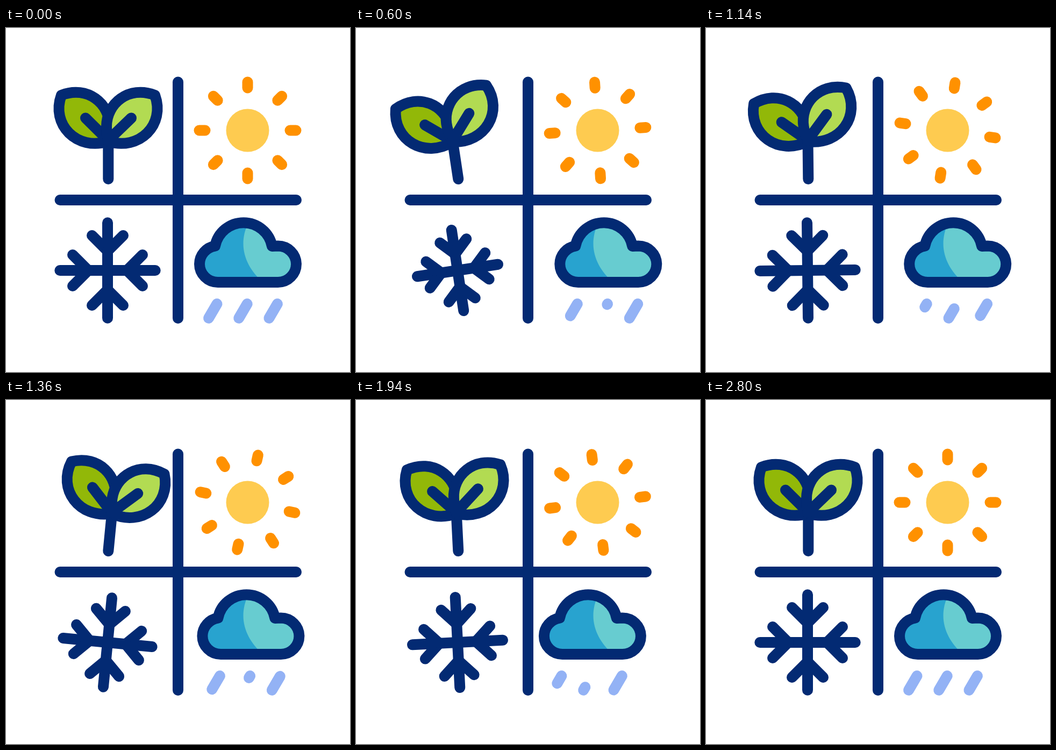
Animation of 640x640 px, one loop 3020 ms. Source, as an HTML page with a canvas:

```html
<!DOCTYPE html>
<html lang="en">
<head>
<meta charset="utf-8">
<title>Four seasons</title>
<style>
html, body { margin: 0; width: 100%; height: 100%; overflow: hidden; background: #fff; }
canvas { display: block; width: 640px; height: 640px; }
</style>
</head>
<body>
<canvas width="640" height="640"></canvas>
<script>
const c = document.querySelector('canvas').getContext('2d');
const LOOP = 3020;
const NAVY = '#032a73';

const rightLeaf = new Path2D('M190 211C248 229 297 180 277 125C228 106 187 141 187 183Q187 200 190 211Z');
const leftLeaf = new Path2D('M190 211C132 229 83 180 103 125C152 106 193 141 193 183Q193 200 190 211Z');
const cloud = new Path2D('M394 473A34 34 0 0 1 360 439A34 34 0 0 1 389 405.6A54 54 0 0 1 495 406L506 405.5A34 34 0 0 1 540 439A34 34 0 0 1 506 473Z');
const cloudLight = new Path2D('M451 362C430 405 446 445 478 473H640V340H451Z');

const clamp = v => Math.min(1, Math.max(0, v));
const ease = v => { v = clamp(v); return v * v * (3 - 2 * v); };

// Eased value through [time, value] pairs.
function track(t, keys) {
  let [t0, v0] = keys[0];
  for (const [t1, v1] of keys) {
    if (t < t1) return v0 + (v1 - v0) * ease((t - t0) / (t1 - t0));
    t0 = t1;
    v0 = v1;
  }
  return v0;
}

const swing = t => track(t, [[0, 0], [800, -10.1], [1405, 5.8], [1905, -3], [2250, 0]]);
const nod = t => track(t, [[210, 0], [1000, -12.3], [1560, 8], [2050, -1.5], [2400, 0]]);
const shrink = t => track(t, [[0, 1], [530, .85], [1150, 1], [1620, .85], [2150, 1]]);
const drift = t => track(t, [[0, 0], [885, 25.5], [1777, -11], [2700, 0]]);
const spin = t => track(t, [[85, 0], [2525, 360]]);

function line(x0, y0, x1, y1, color = NAVY) {
  c.strokeStyle = color;
  c.beginPath();
  c.moveTo(x0, y0);
  c.lineTo(x1, y1);
  c.stroke();
}

function shape(path, fill) {
  c.fillStyle = fill;
  c.fill(path);
  c.strokeStyle = NAVY;
  c.stroke(path);
}

function rotateAt(x, y, deg) {
  c.translate(x, y);
  c.rotate(deg * Math.PI / 180);
  c.translate(-x, -y);
}

function group(draw) {
  c.save();
  draw();
  c.restore();
}

function plant(t) {
  rotateAt(190.3, 281, swing(t));
  line(190.3, 210, 190.3, 281);
  rotateAt(190, 210, nod(t));
  shape(leftLeaf, '#92b808');
  line(148, 167.5, 190, 209);
  shape(rightLeaf, '#b2db52');
  line(233, 167.5, 190, 209);
}

function sun(t) {
  c.translate(449.5, 190.5);
  c.fillStyle = '#fecb50';
  c.beginPath();
  c.arc(0, 0, 40, 0, 7);
  c.fill();
  c.rotate(spin(t) * Math.PI / 180);
  for (let i = 0; i < 8; i++) {
    line(0, -79, 0, -90, '#ff9100');
    c.rotate(Math.PI / 4);
  }
}

function snowflake(t) {
  const s = shrink(t);
  c.translate(189, 451);
  c.rotate(swing(t) * Math.PI / 180);
  for (let i = 0; i < 4; i++) {
    line(0, 0, 0, -88.7 * s);
    line(0, -36 * s, -29 * s, -65 * s);
    line(0, -36 * s, 29 * s, -65 * s);
    c.rotate(Math.PI / 2);
  }
}

function rainCloud(t) {
  const dx = drift(t);
  c.translate(dx, 0);
  group(() => {
    c.clip(cloud);
    c.translate(-dx, 0);
    c.fillStyle = '#28a3cf';
    c.fillRect(300, 340, 340, 150);
    c.fillStyle = '#67ccd0';
    c.fill(cloudLight);
  });
  c.strokeStyle = NAVY;
  c.stroke(cloud);
  [72, 322, 617].forEach((start, i) => drop(392.5 + i * 56.2, t - start));
}

// Each drop runs out at the bottom and grows in again from the top, three times.
function drop(x, t) {
  const part = (a, b) => line(x - 15.5 * a, 513.3 + 26.4 * a, x - 15.5 * b, 513.3 + 26.4 * b, '#93b2f5');
  if (t < 0 || t >= 3 * 716) return part(0, 1);
  const local = t % 716;
  if (local < 272) part(ease(local / 265), 1);
  if (local > 230) part(0, ease((local - 230) / 400));
}

function frame(now) {
  const t = now % LOOP;
  c.fillStyle = '#fff';
  c.fillRect(0, 0, 640, 640);
  c.lineWidth = 20;
  c.lineCap = c.lineJoin = 'round';
  line(320, 100.5, 320, 540);
  line(100.5, 320, 540, 320);
  for (const part of [plant, sun, snowflake, rainCloud]) group(() => part(t));
}

const begin = performance.now();
function tick() {
  frame(performance.now() - begin);
  requestAnimationFrame(tick);
}
tick();
</script>
</body>
</html>
```
